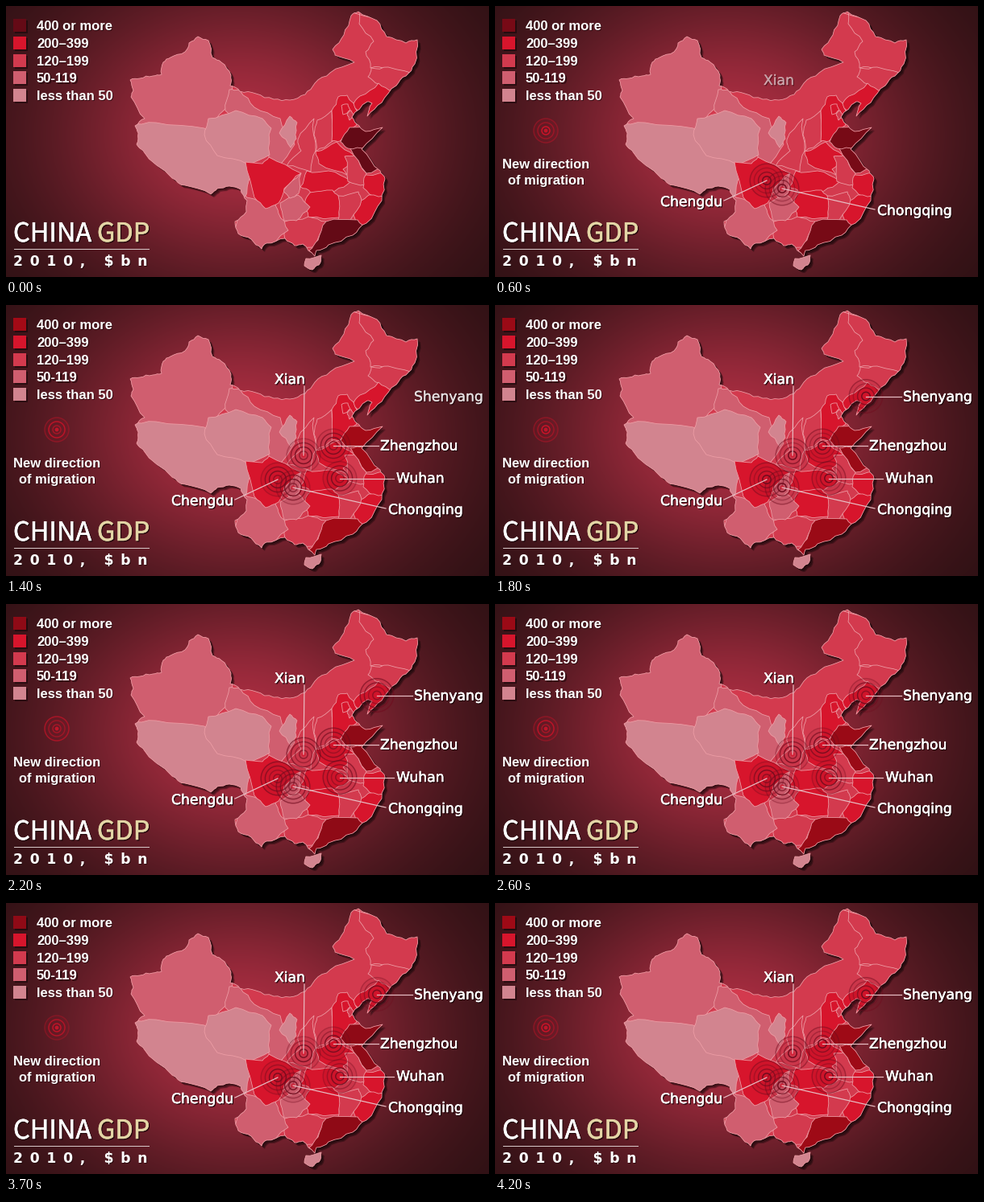
A matplotlib script for the animation above (4300 ms loop, 599 by 337 pixels).

```python
import random

import numpy as np
import matplotlib.pyplot as plt
from matplotlib.animation import FuncAnimation
from matplotlib.patches import Circle, Polygon, Rectangle
from matplotlib.patheffects import withStroke

W, H, DPI = 599, 337, 64
PT = 72 / DPI
STEP, FRAMES = 100, 43

rng = random.Random(4)


def rgb(r, g, b):
    return r / 255, g / 255, b / 255


TOP, HIGH = rgb(100, 10, 20), rgb(215, 21, 44)
MID, LOW, LEAST = rgb(211, 58, 78), rgb(208, 94, 111), rgb(210, 132, 143)
BORDER = rgb(238, 158, 166)
LEADER = rgb(232, 190, 196)
CREAM = rgb(228, 214, 166)
RING, SIGNAL = rgb(112, 12, 30), rgb(205, 18, 40)
SANS = "Liberation Sans"
TITLE = ["Noto Sans CJK JP", SANS]

fig = plt.figure(figsize=(W / DPI, H / DPI), dpi=DPI)
ax = fig.add_axes([0, 0, 1, 1])
ax.set_xlim(0, W)
ax.set_ylim(H, 0)
ax.axis("off")


def ramp(t, start, length):
    return min(1, max(0, (t - start) / length))


def background():
    y, x = np.mgrid[0:H, 0:W]
    d2 = ((x - 290) / 340) ** 2 + ((y - 160) / 265) ** 2
    glow = np.exp(-2 * d2)[..., None]
    core, rim = np.array(rgb(172, 46, 66)), np.array(rgb(38, 15, 17))
    ax.imshow(rim + (core - rim) * glow, extent=(0, W, H, 0), aspect="auto")


def label(x, y, text, size, color="white", family="DejaVu Sans",
          weight="normal", ha="left", stroke=0):
    """Text on a baseline with a soft dark copy behind it."""
    pair = []
    for off, tint, alpha in ((1.2, rgb(25, 4, 8), 0.6), (0, color, 1)):
        item = ax.text(x + off, y + off, text, color=tint, alpha=alpha,
                       fontsize=size * PT, family=family, weight=weight,
                       ha=ha, va="baseline", parse_math=False, zorder=9)
        if stroke:
            item.set_path_effects([withStroke(linewidth=stroke * PT,
                                              foreground=tint)])
        pair.append((item, alpha))
    return pair


def rough(points, depth=2):
    """Bend every edge at its midpoint, repeatedly, like a natural border."""
    for _ in range(depth):
        bent = []
        for (x0, y0), (x1, y1) in zip(points, points[1:] + points[:1]):
            dx, dy = x1 - x0, y1 - y0
            size = np.hypot(dx, dy)
            k = rng.uniform(-1, 1) * min(0.12, 1.8 / size)
            bent += [(x0, y0), ((x0 + x1) / 2 - k * dy, (y0 + y1) / 2 + k * dx)]
        points = bent
    return points


def fill(points, color, edge=BORDER, z=3, **kw):
    return ax.add_patch(Polygon(points, closed=True, facecolor=color,
                                edgecolor=edge, linewidth=0.8 * PT,
                                joinstyle="round", zorder=z, **kw))


background()

# Key points of the border, clockwise from the far west
outline = rough([
    (154, 92), (166, 90), (182, 87), (193, 85), (195, 70), (204, 64),
    (222, 57), (227, 46), (238, 38), (251, 43), (256, 64), (267, 70),
    (279, 86), (278, 99), (290, 106), (310, 109), (332, 116), (352, 117),
    (371, 110), (383, 96), (402, 83), (432, 70), (408, 61), (405, 54),
    (419, 36), (428, 12), (437, 7), (460, 18), (472, 38), (496, 46),
    (510, 42), (507, 72), (496, 87), (484, 99), (466, 120), (448, 137),
    (454, 121), (448, 119), (429, 138), (438, 149), (446, 156), (467, 151),
    (441, 178), (464, 205), (470, 215), (466, 242), (447, 270), (430, 285),
    (400, 297), (385, 304), (383, 311), (368, 296), (358, 298), (346, 289),
    (323, 295), (317, 302), (304, 290), (288, 283), (284, 268), (298, 256),
    (299, 242), (291, 228), (277, 224), (262, 227), (254, 234), (222, 223),
    (206, 214), (170, 180), (162, 172), (164, 158), (160, 149), (172, 140),
    (155, 113), (158, 105)])
hainan = rough([(372, 314), (391, 310), (388, 322), (380, 328), (370, 323)])

for shape in (outline, hainan):
    for off in (1.5, 3, 4):
        fill([(x + off, y + off) for x, y in shape], "black", "none", 1,
             alpha=0.3)
land = fill(outline, MID, "none", 2)
fill(hainan, LEAST)

top_parts = []


def province(color, *corners):
    """Later provinces cover earlier ones; the coast cuts them all."""
    patch = fill(rough(list(corners)), color)
    patch.set_clip_path(land)
    if color == TOP:
        top_parts.append(patch)


# West
province(LOW, (140, 30), (255, 30), (285, 84), (272, 128), (246, 155), (140, 155))
province(LEAST, (150, 146), (186, 145), (246, 152), (300, 190), (305, 210),
         (296, 240), (150, 240))
province(LOW, (277, 104), (290, 105), (308, 126), (340, 140), (358, 172),
         (337, 201), (318, 180), (272, 130))
province(LEAST, (251, 140), (285, 130), (318, 140), (329, 152), (327, 185),
         (300, 197), (262, 186), (246, 160))
province(LEAST, (352, 137), (361, 145), (360, 165), (353, 176), (339, 158))
# Centre and north-east
province(MID, (382, 140), (384, 180), (378, 206), (348, 199), (366, 180), (362, 166))
province(MID, (404, 130), (405, 168), (384, 181), (382, 160), (386, 142))
province(MID, (420, 5), (437, 5), (438, 22), (456, 44), (446, 57), (452, 77),
         (474, 77), (515, 85), (520, 30))
province(MID, (449, 88), (453, 77), (474, 76), (515, 84), (476, 114), (462, 97))
province(HIGH, (429, 124), (439, 112), (462, 96), (480, 106), (447, 142))
province(HIGH, (404, 130), (412, 113), (423, 111), (436, 132), (435, 148),
         (414, 168), (404, 168))
province(HIGH, (416, 124), (424, 122), (427, 129), (418, 135))
province(MID, (423, 134), (428, 130), (432, 138), (426, 142))
province(HIGH, (384, 181), (410, 169), (432, 186), (418, 203), (426, 212),
         (388, 196))
province(HIGH, (373, 205), (400, 205), (428, 218), (408, 230), (378, 232),
         (365, 225))
province(MID, (420, 187), (432, 186), (447, 208), (445, 222), (424, 218))
# East and south
province(HIGH, (446, 210), (480, 205), (476, 236), (460, 240), (443, 226))
province(TOP, (427, 177), (442, 174), (470, 200), (447, 208))
province(TOP, (415, 169), (426, 151), (475, 143), (447, 176), (424, 177))
province(HIGH, (440, 242), (450, 235), (474, 236), (446, 278), (431, 260))
province(MID, (412, 236), (437, 231), (441, 241), (427, 266), (412, 267))
province(HIGH, (377, 232), (405, 229), (412, 236), (413, 263), (375, 263),
         (371, 242))
province(MID, (344, 269), (375, 262), (397, 268), (384, 300), (346, 300))
province(TOP, (397, 268), (436, 266), (450, 276), (384, 318), (376, 304),
         (387, 291))
province(LOW, (296, 236), (312, 242), (334, 240), (338, 258), (350, 279),
         (316, 310), (280, 292))
province(LOW, (340, 245), (362, 235), (377, 250), (360, 267), (345, 267))
province(LOW, (366, 208), (363, 233), (352, 239), (344, 230))
province(HIGH, (297, 194), (318, 196), (326, 188), (366, 208), (345, 227),
         (338, 245), (322, 252), (308, 238))
fill(outline, "none", BORDER, 4)

# Legend and title
levels = [("400 or more", TOP), ("200–399", HIGH), ("120–199", MID),
          ("50-119", LOW), ("less than 50", LEAST)]
for i, (text, color) in enumerate(levels):
    y = 24 + 21.8 * i
    ax.add_patch(Rectangle((11, y - 6), 16, 16, color="black", alpha=0.4,
                           linewidth=0))
    box = ax.add_patch(Rectangle((9, y - 8), 16, 16, facecolor=color,
                                 linewidth=0, zorder=3))
    if color == TOP:
        top_parts.append(box)
    label(38, y + 6, text, 16.6, family=SANS, weight="bold")

label(9, 293, "CHINA", 32.5, family=TITLE, stroke=0.5)
label(113, 293, "GDP", 32.5, CREAM, family=TITLE, stroke=0.5)
ax.plot([10, 177], [302, 302], color=rgb(215, 200, 200), lw=PT, zorder=9)
label(9, 323, "\u2002".join("2010, $bn"), 17.3, weight="bold")


class Beacon:
    """Concentric rings with a wave of strength running outwards."""

    def __init__(self, x, y, start, gap, count, color):
        self.start = start
        self.glow = self.circle(x, y, gap * count, color, 0)
        self.dot = self.circle(x, y, 2.4, HIGH, 0)
        self.rings = [self.circle(x, y, gap * (k + 1), "none", 1.5, color)
                      for k in range(count)]

    @staticmethod
    def circle(x, y, r, face, width, edge="none"):
        return ax.add_patch(Circle((x, y), r, facecolor=face, edgecolor=edge,
                                   linewidth=width * PT, zorder=5))

    def update(self, t):
        show = ramp(t, self.start, 150)
        self.glow.set_alpha(0.08 * show)
        self.dot.set_alpha(0.8 * show)
        for k, ring in enumerate(self.rings):
            share = k / len(self.rings)
            wave = 0.75 + 0.25 * np.cos(2 * np.pi * (t / 600 - share))
            ring.set_alpha(show * wave * (1 - 0.5 * share))


class City:
    """The name wipes in, then its leader grows, then the rings light up."""

    def __init__(self, name, place, tip, centre, start):
        self.start, self.tip, self.centre = start, tip, centre
        self.items = label(*place, name, 17.2, stroke=0.5)
        self.line, = ax.plot([], [], color=LEADER, lw=1.2 * PT, zorder=7)
        self.beacon = Beacon(*centre, start + 200, 5.2, 4, RING)
        box = self.items[0][0].get_window_extent(fig.canvas.get_renderer())
        self.x0, self.x1 = box.x0 - 2, box.x1 + 2
        self.mask = Rectangle((0, 0), 1, H, transform=ax.transData)
        for item, _ in self.items:
            item.set_clip_path(self.mask)

    def update(self, t):
        k = ramp(t, self.start, 250)
        for item, alpha in self.items:
            item.set_alpha(alpha * k * k * (3 - 2 * k))
        width = (self.x1 - self.x0) * min(1, 2.1 * k)
        from_left = self.tip[0] > self.x1 - 5
        self.mask.set_x(self.x0 if from_left else self.x1 - width)
        self.mask.set_width(width)
        for item, _ in self.items:
            item.set_clip_path(self.mask)
        grow = ramp(t, self.start + 150, 100)
        (x0, y0), (x1, y1) = self.tip, self.centre
        self.line.set_data([x0, x0 + grow * (x1 - x0)],
                           [y0, y0 + grow * (y1 - y0)])
        self.line.set_visible(grow > 0)
        self.beacon.update(t)


# name, text place, leader start, beacon centre
places = [("Chengdu", (205, 249), (284, 242), (337, 217)),
          ("Chongqing", (474, 260), (471, 253), (356, 227)),
          ("Xian", (333, 98), (370, 101), (369, 187)),
          ("Wuhan", (484, 221), (481, 215.5), (414, 215.5)),
          ("Zhengzhou", (464, 180.5), (462, 175), (406, 175)),
          ("Shenyang", (506, 119.5), (504, 113.5), (460, 113.5))]
cities = [City(*place, 250 * i) for i, place in enumerate(places)]

key = Beacon(63, 155, 0, 5, 3, SIGNAL)
caption = [item for i, text in enumerate(("New direction", "of migration"))
           for item in label(63, 202 + 20 * i, text, 16.5, family=SANS,
                             weight="bold", ha="center")]


def update(frame):
    t = frame * STEP
    sway = 10 * np.cos(2 * np.pi * (t - 2950) / 1500) * ramp(t, 0, 1400)
    color = rgb(100 + 53 * ramp(t, 0, 1400) + sway, 10, 22)
    for part in top_parts:
        part.set_facecolor(color)
    for item, alpha in caption:
        item.set_alpha(alpha * ramp(t, 0, 250))
    key.update(t)
    for city in cities:
        city.update(t)
    return []


anim = FuncAnimation(fig, update, frames=FRAMES, interval=STEP, repeat=True,
                     repeat_delay=0, blit=False)
plt.show()
```
